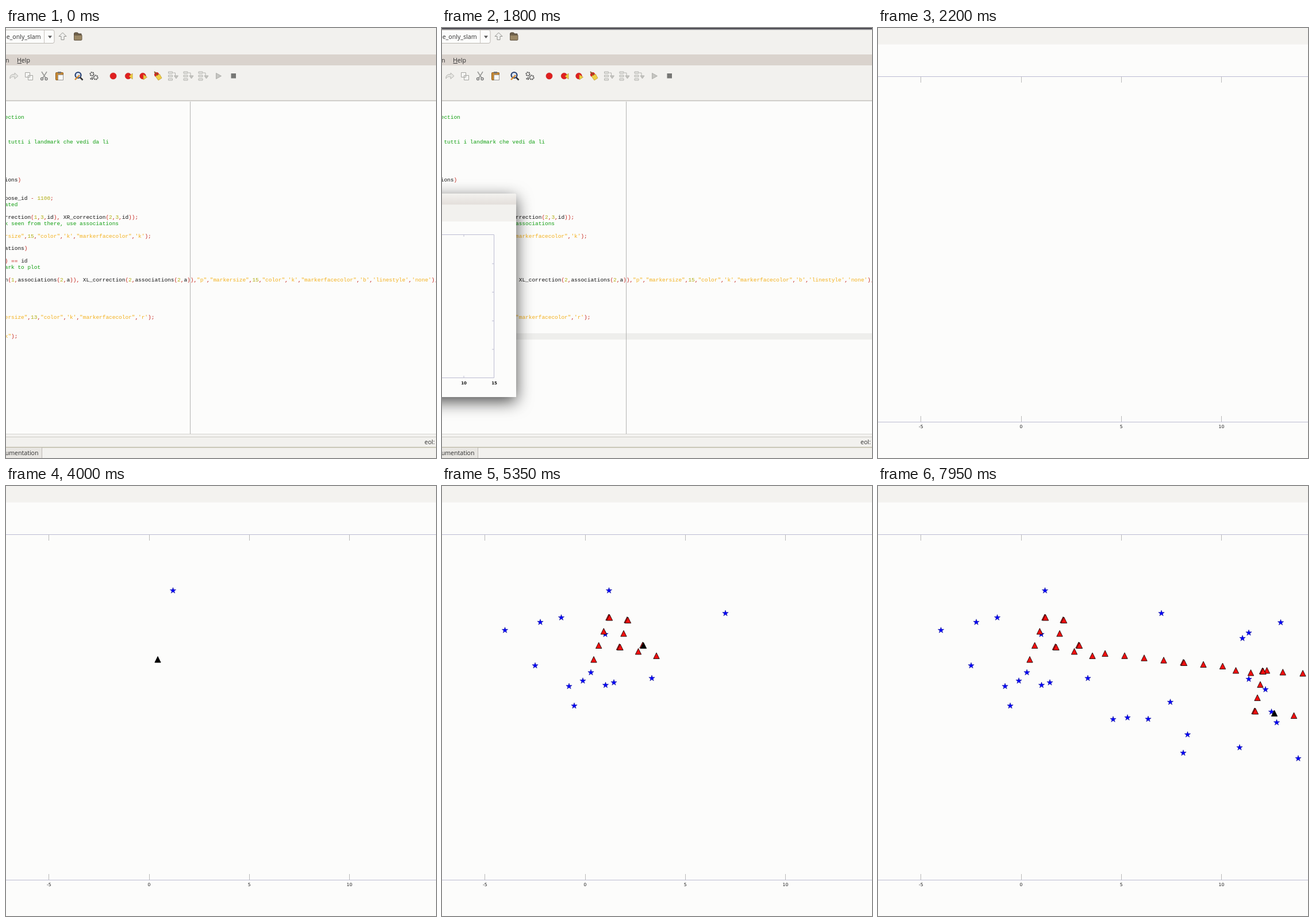
Write an HTML page that moves like this. It is 748 by 748 pixels and loops after 8000 ms.

```html
<!DOCTYPE html>
<html lang="en">
<head>
<meta charset="utf-8">
<title>Landmark map playback</title>
<style>
  html, body { margin: 0; width: 100%; height: 100%; overflow: hidden; background: #f3f2ef; }
  svg { display: block; width: 100vw; height: 100vh; }
  text { white-space: pre; }
  .ui { font: 10.6px "Open Sans", sans-serif; fill: #2e2e2e; }
  .code { font: 9.455px "Liberation Mono", monospace; }
  .tick { font: 7.6px "DejaVu Sans", sans-serif; fill: #111; text-anchor: middle; }
  .small { font-weight: bold; font-size: 7px; }
  .axis { stroke: #bcbcd2; fill: none; }
  .mark { stroke: #b9b9b9; fill: none; }
  .grey { stroke: #b4b4b0; fill: #e6e6e2; }
</style>
</head>
<body>
<svg viewBox="0 0 748 748">
  <defs>
    <filter id="shadow" x="-60%" y="-30%" width="220%" height="160%">
      <feDropShadow dx="0" dy="8" stdDeviation="14" flood-color="#000" flood-opacity=".7"/>
    </filter>
    <linearGradient id="title" x2="0" y2="1">
      <stop offset="0" stop-color="#f3f2ef"/><stop offset="1" stop-color="#e3deda"/>
    </linearGradient>
    <linearGradient id="dim" x2="0" y2="1">
      <stop offset=".3" stop-color="#46444c"/><stop offset="1" stop-color="#46444c" stop-opacity="0"/>
    </linearGradient>
    <g id="step" class="grey">
      <path d="M-8-7h7v3h-7zM-8-1h7v3h-7zM-8 5h7v3h-7z"/>
      <path d="M0-5h4v5" fill="none"/>
      <path d="M2 0h7l-3.500 5z" fill="#c4c4c0"/>
    </g>
  </defs>

  <g id="editor">
    <rect width="748" height="748" fill="#f2f1ee"/>
    <rect id="edge" width="748" height="4" fill="url(#dim)"/>
    <rect x="-6" y="3.500" width="90" height="23" rx="3" fill="#fcfcfb" stroke="#bdb9b3"/>
    <path d="M66.500 4V26" stroke="#c8c4be"/>
    <path d="M73 13.500h7l-3.500 4.500z" fill="#555"/>
    <text class="ui" x="60.500" y="19" text-anchor="end">e_only_slam</text>
    <path d="M98.500 8l6.500 6.500h-4v6h-5v-6h-4z" fill="#f0f0ee" stroke="#92928e"/>
    <path d="M118.500 10q0-2 2-2h4l1.500 2h5v11h-12.500z" fill="#6e604b" stroke="#55493a"/>
    <path d="M118.500 12.500h13.500v7.500q0 1-1 1h-11.500q-1 0-1-1z" fill="#9a8765" stroke="#6b5d46"/>

    <rect y="46" width="748" height="19" fill="#dad3cd"/>
    <text class="ui" x="5.500" y="60" text-anchor="end">n</text>
    <text class="ui" x="19" y="60">Help</text>
    <path d="M19.500 61.500h7.500" stroke="#3c3c3c"/>

    <path d="M7 88c-1-6 4-8 8-7v-3l6 5.500-6 5v-3.500c-4-1-6 0-8 3z" class="grey"/>
    <path d="M33.500 77.500h8v8h-8zM38.500 82.500h8v8h-8z" fill="#f6f6f4" stroke="#a4a4a0"/>
    <path d="M62 76l7 11M71 76l-7 11" stroke="#9a9a98" stroke-width="1.600"/>
    <g fill="none" stroke="#777" stroke-width="1.400"><circle cx="62.500" cy="88.500" r="2"/><circle cx="70" cy="88.500" r="2"/></g>
    <rect x="86.500" y="77.500" width="13" height="13" rx="1" fill="#c98a35" stroke="#8a5c1f"/>
    <path d="M90.500 81.500h9v9h-9z" fill="#fafaf8" stroke="#999"/>
    <rect x="90" y="76" width="6" height="3" fill="#777"/>
    <circle cx="125.500" cy="82" r="5" fill="#dce6f4" stroke="#263f70" stroke-width="2.200"/>
    <path d="M129 86l4.500 4.500" stroke="#333" stroke-width="2.500"/>
    <path d="M120 90l8-8" stroke="#d88a2c" stroke-width="2.400"/>
    <g fill="none" stroke="#555" stroke-width="2.200" stroke-dasharray="2 1">
      <circle cx="149.500" cy="80" r="3"/><circle cx="156" cy="86" r="3.500"/><circle cx="149" cy="88" r="1.500"/>
    </g>
    <g fill="#e01f1f" stroke="#b81818" stroke-width=".6">
      <circle cx="186.500" cy="83.500" r="5.500"/><circle cx="212.500" cy="83.500" r="5.300"/>
      <circle cx="238" cy="83.500" r="5.300"/><circle cx="262" cy="81" r="3.800"/>
    </g>
    <g fill="#f0cf45" stroke="#b8922a" stroke-width=".7">
      <path d="M220 79v10l-6-5zM239 81v9l6.500-4.500zM260 84l7-4 4 7-6 4z"/>
    </g>
    <path d="M258 76l6 6" stroke="#8a5a22" stroke-width="1.800"/>
    <use href="#step" x="290.500" y="83"/><use href="#step" x="317" y="83"/><use href="#step" x="343" y="83"/>
    <path d="M365.500 78.500v10l9-5z" fill="#c6c6c2" stroke="#adada9"/>
    <rect x="391.500" y="79" width="8.500" height="8.500" fill="#777775"/>

    <rect y="126" width="748" height="582" fill="#fcfcfb"/>
    <path d="M0 126.500h748" stroke="#c2c0bb" stroke-width="1.500"/>
    <rect id="row" y="531" width="748" height="11" fill="#eeeeec"/>
    <g id="code" class="code"></g>
    <path d="M320.500 128V706" stroke="#b4b4b2"/>
    <path d="M0 706.500h748M0 711.500h748" stroke="#cfcdc8"/>
    <text class="ui" x="728" y="724">eol:</text>
    <path d="M0 729.500h748" stroke="#bab7a4" stroke-width="1.500"/>
    <path d="M0 730h62.500v18H0z" fill="#e8e6e2"/><path d="M62.500 730v18" stroke="#bcb9b4"/>
    <text class="ui" x="56.500" y="743" text-anchor="end">umentation</text>

    <g id="popup">
      <path d="M-300 288H125q4 0 4 4V642H-300z" fill="#fcfcfb" filter="url(#shadow)"/>
      <path d="M-300 288H125q4 0 4 4V307.500H-300z" fill="url(#title)"/>
      <rect x="-300" y="307.500" width="429" height="29" fill="#f2f1ee"/>
      <path class="axis" d="M-10 359.500H90.500V608.500H-10M38 360v3M38 608v-3M90 410h-3M90 459.500h-3M90 509.500h-3M90 559h-3"/>
      <text class="tick small" x="38" y="619.500">10</text>
      <text class="tick small" x="91" y="619.500">15</text>
    </g>
  </g>

  <g id="figure">
    <rect width="748" height="748" fill="#f3f2ef"/>
    <g id="plot">
      <rect y="28.500" width="748" height="720" fill="#fcfcfb"/>
      <path class="axis" d="M0 84.500h748M0 685.500h748"/>
      <g id="ticks"></g>
      <g id="stars"></g>
      <g id="poses"></g>
    </g>
  </g>
</svg>
<script>
const LOOP = 8000;
const $ = id => document.getElementById(id);
const show = (node, on) => node.setAttribute("visibility", on ? "inherit" : "hidden");

function add(parent, tag, attrs, text) {
  const node = document.createElementNS("http://www.w3.org/2000/svg", tag);
  for (const key in attrs) node.setAttribute(key, attrs[key]);
  if (text !== undefined) node.textContent = text;
  parent.appendChild(node);
  return node;
}

// The first twelve columns lie left of the stage
const listing = `      % correction



           % tutti i landmark che vedi da li





    associations)


            pose_id - 1100;
    % associated

       XR_correction(1,3,id), XR_correction(2,3,id));
   % landmark seen from there, use associations

      "markersize",15,"color",'k',"markerfacecolor",'k');

      associations)

            ) == id
     % landmark to plot

XL_correction(1,associations(2,a)), XL_correction(2,associations(2,a)),"p","markersize",15,"color",'k',"markerfacecolor",'b','linestyle','none');





       "markersize",13,"color",'k',"markerfacecolor",'r');


           "k");`;
const token = /"[^"]*"|'[^']*'|[A-Za-z_]\w*|\d+|\s+|[^\w\s"']/g;

function tint(part) {
  if (/^["']/.test(part)) return "#f3b01c";
  if (/^\d/.test(part)) return "#b0ac10";
  return /^[\w\s]/.test(part) ? "#111" : "#c4241c";
}

listing.split("\n").forEach((line, n) => {
  if (!line) return;
  const node = add($("code"), "text", { x: -70.2, y: 157.5 + n * 10.9 });
  const parts = line.includes("%") ? [line] : line.match(token);
  for (const part of parts) add(node, "tspan", { fill: parts.length > 1 ? tint(part) : "#0f9e0f" }, part);
});

for (let value = -5; value <= 10; value += 5) {
  const x = 249 + value * 34.84;
  const px = Math.floor(x) + 0.5;
  add($("ticks"), "path", { class: "mark", d: `M${px} 85V95M${px} 675V685` });
  add($("ticks"), "text", { class: "tick", x, y: 696 }, value);
}

// The route's corners: x, y, steps to get there, and whether the robot turns on the spot
const TURN = true;
const corners = [
  [264, 302, 1], [290, 228.5, 3, TURN], [322, 233, 1, TURN], [308.5, 280, 2, TURN], [373, 295.5, 2],
  [349, 277, 1, TURN], [395, 291.5, 1], [531, 307, 4, TURN], [599.5, 313.5, 2], [622.5, 321, 1],
  [669.5, 322, 1], [739, 326, 2], [676.5, 321, 1], [648.5, 325, 1], [668.5, 322, 1, TURN],
  [655, 391.5, 3, TURN], [723.5, 399.5, 1], [689.5, 395.5, 1]
];

function drive(corners) {
  const route = [];
  let [x, y] = corners[0];
  for (const [cx, cy, steps, turn] of corners) {
    for (let s = 1; s <= steps; s++) route.push([x + (cx - x) * s / steps, y + (cy - y) * s / steps]);
    [x, y] = [cx, cy];
    if (turn) route.push([x += 1.5, y += 0.5]);
  }
  return route;
}

// Landmarks in order of discovery, one with each pose
const landmarks = [
  [290.5, 182], [207.5, 229], [171, 237], [109.5, 251], [284, 258], [162, 312.5], [493, 221.5],
  [284.5, 346.5], [299, 342], [259, 324.5], [245, 339], [221, 348.5], [230, 382.5], [365, 334.5],
  [409, 406], [434, 403], [470, 405.5], [508.5, 376], [634, 265], [645, 255.5], [645, 336],
  [674, 354], [700.5, 237.5], [684.5, 393], [693.5, 411.5], [629, 455], [538.5, 432.5], [531, 464.5], [731, 474]
];

const starPath = "M" + Array.from({ length: 10 }, (_, k) => {
  const r = k % 2 ? 2.1 : 5.4, a = k * Math.PI / 5;
  return (r * Math.sin(a)).toFixed(2) + " " + (-r * Math.cos(a)).toFixed(2);
}).join("L") + "Z";

const plot = (layer, points, style) => points.map(([x, y]) =>
  add($(layer), "path", { transform: `translate(${x} ${y})`, ...style }));
const stars = plot("stars", landmarks, { d: starPath, fill: "#00f", stroke: "#00007a", "stroke-width": 0.5 });
const robots = plot("poses", drive(corners), { d: "M0-5.500L5.200 5H-5.200Z", stroke: "#000", "stroke-width": 0.8 });

// Each redraw takes a little longer than the last
const poseTime = i => 4000 + 100 * i + 0.17 * i * i;

function draw(t) {
  const mapped = t >= 2100;
  show($("editor"), !mapped);
  show($("figure"), mapped);
  show($("row"), t >= 50);
  show($("edge"), t >= 900);
  show($("plot"), t >= 2200);

  const open = Math.min(1, Math.max(0, (t - 900) / 200));
  const scale = 0.9 + 0.1 * open;
  $("popup").setAttribute("opacity", open);
  $("popup").setAttribute("transform", `translate(-85 465) scale(${scale}) translate(85 -465)`);

  robots.forEach((node, i) => {
    show(node, t >= poseTime(i));
    const left = i + 1 < robots.length && t >= poseTime(i + 1);
    node.setAttribute("fill", left ? "#f00f0f" : "#000");
  });
  stars.forEach((node, i) => show(node, t >= poseTime(i)));
}

const start = performance.now();
function tick() {
  draw((performance.now() - start) % LOOP);
  requestAnimationFrame(tick);
}
tick();
</script>
</body>
</html>
```
